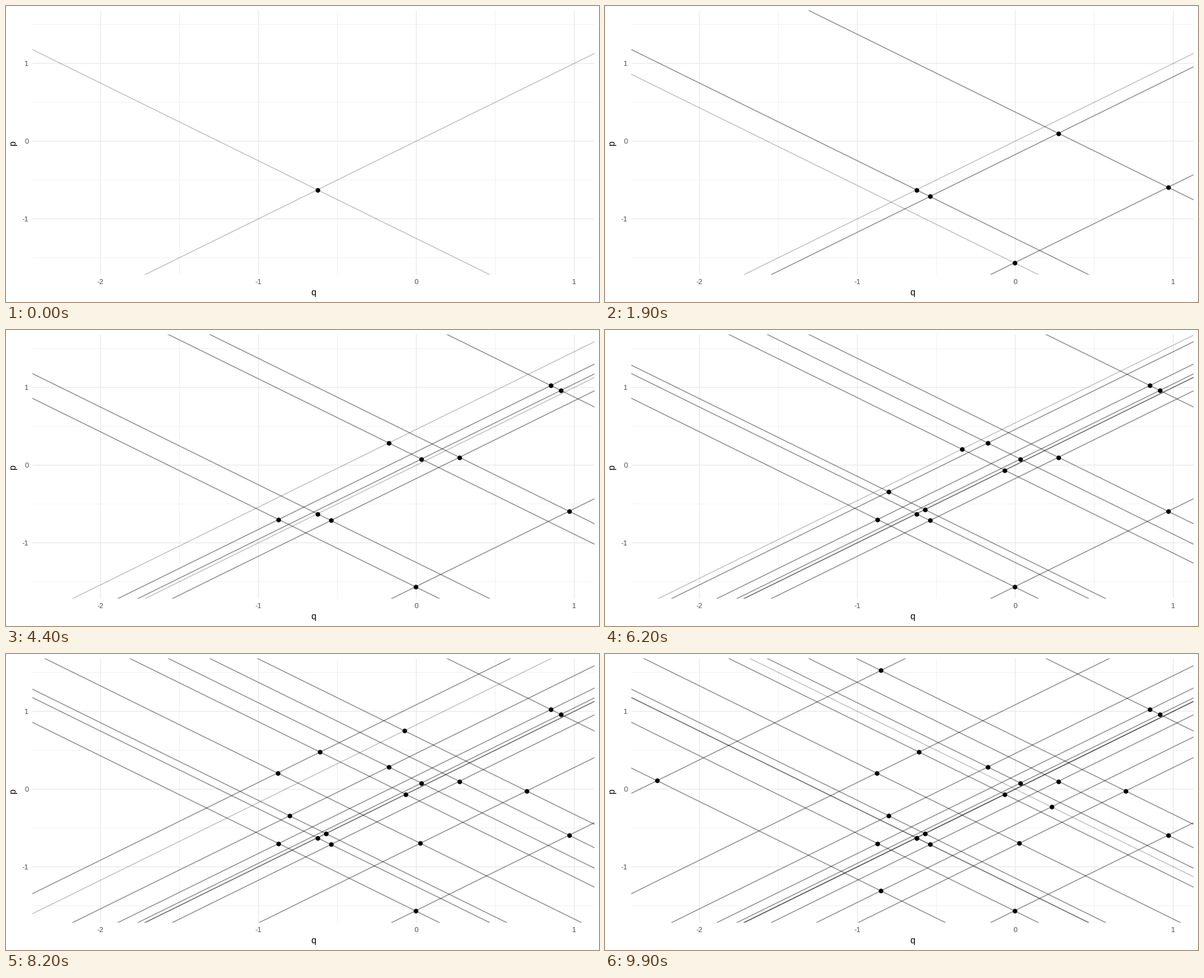
A matplotlib script that plays this animation: 1058 by 529 pixels, repeating every 10000 ms.

```python
import matplotlib.pyplot as plt
from matplotlib.animation import FuncAnimation
from matplotlib.collections import LineCollection

W, H, DPI = 1058, 529, 100
LEFT, RIGHT, TOP, BOTTOM = 47.4, 1050, 8, 480.2
X0, Y0, SX, SY = 732.1, 241.5, 281.75, 138.9   # pixel origin and scale of the data
PX = 72 / DPI                                  # points per pixel

# The chain alternately redraws q + p and p - q.
START_DIFF = 0
DRAWS = [-1.253, -0.172, 0.3735, -1.5605, -1.5715, 0.1722, 1.876, 0.0458,
         0.1107, 0.4597, -1.145, 0.0015, -0.1327, 1.086, -0.6714, -0.722,
         0.6752, 2.3775, -2.160, -0.4573, 0.0005]
ARRIVALS = [*range(4, 50, 5), *range(53, 84, 5), 87, 91, 95, 99]
FRAMES = 100


def build_chain():
    total, diff = None, START_DIFF
    points = []
    for i, value in enumerate(DRAWS):
        if i % 2 == 0:
            total = value
        else:
            diff = value
        points.append(((total - diff) / 2, (total + diff) / 2))
    return points


CHAIN = build_chain()

plt.rcParams["font.family"] = "Liberation Sans"
fig = plt.figure(figsize=(W / DPI, H / DPI), dpi=DPI, facecolor="white")
ax = fig.add_axes([LEFT / W, 1 - BOTTOM / H, (RIGHT - LEFT) / W, (BOTTOM - TOP) / H])
Q_MIN, Q_MAX = (LEFT - X0) / SX, (RIGHT - X0) / SX
P_MIN, P_MAX = (Y0 - BOTTOM) / SY, (Y0 - TOP) / SY
ax.set(xlim=(Q_MIN, Q_MAX), ylim=(P_MIN, P_MAX))
ax.axis("off")


def label(x, y, text, size, color, **kw):
    fig.text(x / W, 1 - y / H, text, size=size * PX, color=color, **kw)


def grid(qs, ps, width):
    style = dict(color="#ebebeb", lw=width * PX, snap=False, zorder=1)
    for q in qs:
        ax.axvline(q, **style)
    for p in ps:
        ax.axhline(p, **style)


grid((-1.5, -0.5, 0.5), (-1.5, -0.5, 0.5, 1.5), 0.78)
grid((-2, -1, 0, 1), (-1, 0, 1), 1.55)

for q in (-2, -1, 0, 1):
    label(X0 + q * SX, 497, str(q), 12.8, "#4d4d4d", ha="center", va="baseline")
for p in (-1, 0, 1):
    label(40.3, Y0 - p * SY + 4.6, str(p), 12.8, "#4d4d4d", ha="right", va="baseline")
label((LEFT + RIGHT) / 2, 516.5, "q", 16, "black", ha="center", va="baseline")
label(19.5, (TOP + BOTTOM) / 2, "p", 16, "black", ha="right", va="center", rotation=90)

lines = LineCollection([], colors=[(0, 0, 0, 0.25)], linewidths=1.55 * PX, zorder=2)
lines.set_snap(False)
ax.add_collection(lines, autolim=False)
dots, = ax.plot([], [], "o", color="black", ms=8.3 * PX, mew=0, zorder=3)
dots.set_snap(False)


def visible_points(frame):
    arrived = sum(a <= frame for a in ARRIVALS)
    points = [CHAIN[i % len(CHAIN)] for i in range(arrived + 1)]
    if frame + 1 in ARRIVALS:
        (q0, p0), (q1, p1) = points[-1], CHAIN[(arrived + 1) % len(CHAIN)]
        points.append(((q0 + q1) / 2, (p0 + p1) / 2))
    return points


def diagonal(q, p, slope):
    return [(x, p + slope * (x - q)) for x in (Q_MIN - 0.1, Q_MAX + 0.1)]


def update(frame):
    points = visible_points(frame)
    lines.set_segments([diagonal(q, p, s) for q, p in points for s in (1, -1)])
    dots.set_data(*zip(*points))
    return lines, dots


anim = FuncAnimation(fig, update, frames=FRAMES, interval=100, repeat=True, repeat_delay=0)
plt.show()
```
